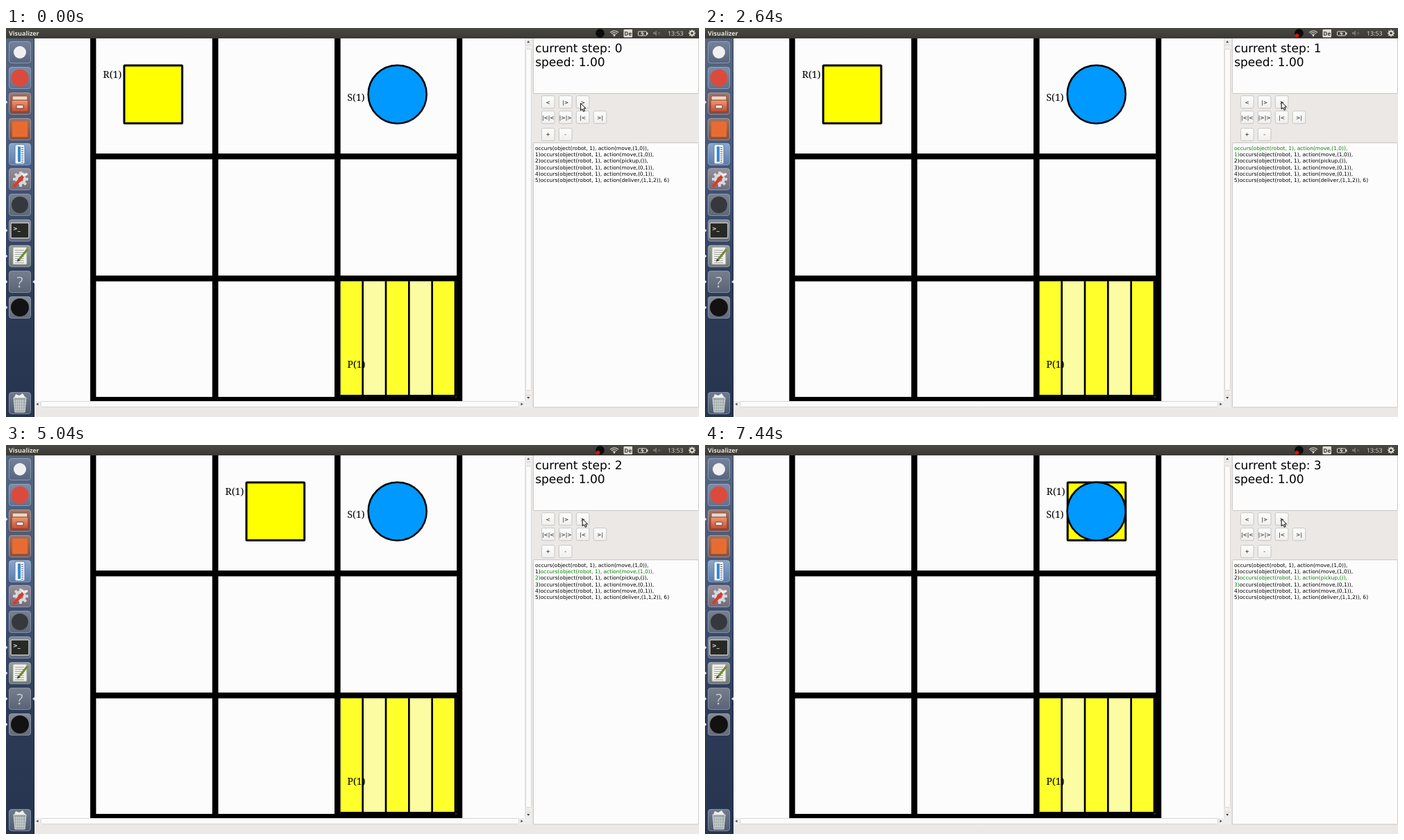
These frames come from a looping animation (998x561 px, 8 s). An HTML page with a canvas:

```html
<!DOCTYPE html>
<html lang="en">
<head>
<meta charset="utf-8">
<title>Visualizer</title>
<style>
html, body { margin: 0; width: 100%; height: 100%; overflow: hidden; background: #fcfcfc; }
canvas { display: block; }
</style>
</head>
<body>
<canvas id="stage" width="998" height="561"></canvas>
<script>
const ctx = document.getElementById('stage').getContext('2d');
const LOOP = 8000;
const SANS = '"DejaVu Sans", sans-serif';
const SERIF = '"Noto Serif", serif';
const UI = '"Open Sans", sans-serif';
const STEPS = [2260, 4240, 7040];
const PRESSES = [[1940, 2080], [3940, 4080], [6740, 6880]];
const ACTIONS = ['move,(1,0)', 'move,(1,0)', 'pickup,()', 'move,(0,1)', 'move,(0,1)', 'deliver,(1,1,2)'];

function rect(x, y, w, h, fill) {
  ctx.fillStyle = fill;
  ctx.fillRect(x, y, w, h);
}

function box(x, y, w, h, r, fill, stroke, line = 1) {
  ctx.beginPath();
  ctx.roundRect(x, y, w, h, r);
  paint(fill, stroke, line);
}

function disc(x, y, r, fill, stroke, line = 1) {
  ctx.beginPath();
  ctx.arc(x, y, r, 0, 2 * Math.PI);
  paint(fill, stroke, line);
}

function poly(points, fill, stroke, line = 1) {
  ctx.beginPath();
  points.forEach(([x, y]) => ctx.lineTo(x, y));
  ctx.closePath();
  paint(fill, stroke, line);
}

function paint(fill, stroke, line) {
  if (fill) { ctx.fillStyle = fill; ctx.fill(); }
  if (stroke) { ctx.strokeStyle = stroke; ctx.lineWidth = line; ctx.stroke(); }
}

function stroke(points, color, line) {
  ctx.beginPath();
  points.forEach(([x, y]) => ctx.lineTo(x, y));
  paint(null, color, line);
}

function text(str, x, y, font, color = '#000', align = 'left') {
  ctx.font = font;
  ctx.fillStyle = color;
  ctx.textAlign = align;
  ctx.fillText(str, x, y);
}

function fade(y0, y1, ...colors) {
  const g = ctx.createLinearGradient(0, y0, 0, y1);
  colors.forEach((c, i) => g.addColorStop(i / (colors.length - 1), c));
  return g;
}

function gear(x, y, r, color, hole) {
  for (let i = 0; i < 8; i++) {
    const a = i * Math.PI / 4, c = Math.cos(a), s = Math.sin(a);
    stroke([[x + c * r * 0.5, y + s * r * 0.5], [x + c * r, y + s * r]], color, r * 0.35);
  }
  disc(x, y, r * 0.72, color);
  disc(x, y, r * 0.35, hole);
}

function topBar(t) {
  rect(0, 0, 998, 15, fade(0, 15, '#4a4843', '#3a3934'));
  text('Visualizer', 4, 10.5, `bold 9px ${UI}`, '#e4e0d8');
  disc(855.5, 7.5, 6.3, '#0b0b0b');
  if (t >= 200) disc(852.5, 11, 2.8, '#e00f0f');

  const ink = '#dfdbd2';
  for (const r of [3, 5.5, 8]) {
    ctx.beginPath();
    ctx.arc(876, 12, r, -Math.PI * 0.76, -Math.PI * 0.24);
    paint(null, ink, 1.1);
  }
  disc(876, 11, 1.2, ink);
  box(889.5, 2, 12.5, 11.5, 1, ink);
  text('De', 895.8, 10.8, `bold 8px ${UI}`, '#3c3b37', 'center');
  box(910.5, 5, 12, 6, 1, null, ink);
  rect(923, 6.5, 1.5, 3, ink);
  poly([[917, 4], [914, 8.5], [916.5, 8.5], [915.5, 12], [919, 7.5], [916.6, 7.5]], ink);
  poly([[932, 6], [934, 6], [937, 3.5], [937, 11.5], [934, 9], [932, 9]], '#77746d');
  stroke([[939, 6], [942, 9.5]], '#77746d', 1);
  stroke([[942, 6], [939, 9.5]], '#77746d', 1);
  text('13:53', 953, 10.8, `8.8px ${UI}`, ink);
  gear(988, 7.5, 5, ink, '#3c3b37');
}

function tile(y, top, bottom) {
  box(4.5, y - 15.5, 31, 31, 3.5, fade(y - 16, y + 16, top, bottom), 'rgba(220,225,235,.4)');
}

function launcher() {
  rect(0, 15, 41, 546, fade(15, 561, '#566681', '#45577a', '#2d3b57', '#263450'));
  rect(40, 15, 1, 546, 'rgba(10,15,30,.5)');

  tile(35, '#75829a', '#56647e');
  disc(20, 35, 9, '#f0f0f2');
  tile(72, '#7d8da6', '#60728e');
  disc(20, 72, 12.5, '#dc4a3d');

  tile(109, '#a5776b', '#78504b');
  box(9, 98, 22, 10, 1.5, '#e8d8c4', '#82452c');
  box(8, 104, 24, 17, 1.5, fade(104, 121, '#ef9b78', '#c24c32'), '#8b3524');
  box(15, 111, 10, 5, 1, '#eee6df', '#773425');

  tile(146, '#a3735c', '#835343');
  box(9, 135, 22, 22, 1, '#e86c31');

  tile(182, '#8ba8ce', '#5c7ba9');
  box(13, 168, 14, 28, 2, '#f0f4f6', '#5c7da6');
  rect(17, 171, 4, 22, '#348bd0');
  for (let y = 172; y < 194; y += 3) rect(22, y, 3, 1, '#667');

  tile(218, '#978f98', '#706c7b');
  gear(21, 218, 11, '#d6d8da', '#85818d');
  stroke([[11, 229], [26, 212]], '#d93b2b', 4.5);
  stroke([[23, 209], [26, 213], [31, 210]], '#eee', 3);

  tile(255, '#77818f', '#5d6877');
  disc(20, 255, 12, '#35393d');

  tile(292, '#848b98', '#5c6678');
  box(7, 281, 26, 22, 1.5, '#282925', '#c5c7c5', 1.5);
  text('>_', 10, 292, `bold 8px ${SANS}`, '#f0f0ec');

  tile(329, '#969f9a', '#6c787a');
  box(10, 316, 20, 25, 1, '#eff0e9', '#999');
  for (let y = 320; y < 339; y += 3) rect(13, y, 13, 1, '#a4a7a4');
  stroke([[18, 335], [31, 319]], '#718d35', 3.2);
  poly([[16, 337], [17, 333], [20, 335.5]], '#333');

  tile(366, '#777f8e', '#596375');
  text('?', 20, 373.5, `21px ${UI}`, '#c6cbd1', 'center');
  tile(403, '#858b96', '#626a79');
  disc(20, 403, 13, '#121212');

  tile(541, '#707b8e', '#4d5a71');
  poly([[11, 533], [29, 533], [27, 554], [13, 554]], '#9ca6a7', '#dce1df');
  for (let x = 15; x < 27; x += 3) stroke([[x, 536], [x + 0.3, 552]], '#e0e5e1', 0.8);
  for (let y = 538; y < 552; y += 4) stroke([[12, y], [28, y]], '#d5dcda', 0.7);
  poly([[12, 533], [14, 528], [19, 530], [24, 527], [28, 533]], '#eef0ec');

  for (const y of [107, 292, 329, 366, 403]) poly([[0, y - 2.5], [2.5, y], [0, y + 2.5]], '#d8dce4');
  poly([[41, 363.5], [38, 366], [41, 368.5]], '#d8dce4');
}

function robot(dx) {
  box(170.2 + dx, 54, 83.6, 83.6, 1, '#ffff00', '#000', 3);
  text('R(1)', 139.8 + dx, 72.3, `14px ${SERIF}`);
}

function board(step) {
  rect(41, 15, 707, 523, '#fcfcfc');
  rect(121.3, 15, 535.9, 523, '#000');
  for (let col = 0; col < 3; col++) {
    for (let row = 0; row < 3; row++) {
      const y = row ? 13.4 + row * 176 : 15;
      const end = row < 2 ? 181 + row * 176 : 532;
      rect(129.7 + col * 176, y, 167.4, end - y, '#fcfcfc');
    }
  }
  rect(481.5, 365.2, 168, 167, '#000');
  for (let i = 0; i < 5; i++) {
    rect(481.8 + i * 33.3, 365.3, 30.6, 163.7, i % 2 ? '#fcfca2' : '#ffff2b');
  }
  rect(647.5, 531.5, 1, 1, '#ddd');
  text('P(1)', 491.5, 490.3, `14px ${SERIF}`);

  robot(Math.max(0, step - 1) * 176);
  disc(563.7, 95.7, 42, '#0099ff', '#000', 2.5);
  text('S(1)', 491.5, 105.3, `14px ${SERIF}`);
}

function scrollbars() {
  rect(748, 15, 9, 532, '#f0eeec');
  rect(747.5, 15, 0.8, 523, '#d3d0cc');
  box(748.5, 30.5, 8, 492, 1, '#fbfbfb', '#d2cfcb', 0.8);
  rect(748, 24, 9, 0.7, '#d2cfcb');
  rect(748, 529, 9, 0.7, '#d2cfcb');
  poly([[750.2, 21.2], [754.2, 21.2], [752.2, 18.2]], '#444');
  poly([[750.2, 532], [754.2, 532], [752.2, 535]], '#444');

  rect(41, 538, 716, 9, '#f0eeec');
  box(50.5, 538.5, 688, 8, 1, '#fbfbfb', '#d2cfcb', 0.8);
  poly([[46.5, 540.5], [46.5, 544.5], [43.5, 542.5]], '#444');
  poly([[741.5, 540.5], [741.5, 544.5], [744.5, 542.5]], '#444');
  rect(41, 547, 957, 14, '#ebe8e5');
}

function button(label, col, y, down) {
  const x = 780.8 + col * 24.9;
  const fill = down ? '#d3d1cf' : fade(y - 9, y + 9, '#fdfdfd', '#f1efed');
  box(x - 9.3, y - 9, 18.6, 18, 2, fill, down ? '#aaa6a2' : '#c5c1bd', 0.9);
  text(label, x, y + 2.7, `7.6px ${SANS}`, '#111', 'center');
}

function panel(step, down) {
  rect(757, 15, 241, 532, '#ebe8e5');
  box(759.4, 14.5, 238.2, 80, 1, '#fcfcfc', '#c5c1bd', 0.9);
  box(759.4, 165.6, 238.2, 381.4, 1, '#fcfcfc', '#c5c1bd', 0.9);
  text(`current step: ${step}`, 762.2, 34.6, `17px ${SANS}`);
  text('speed: 1.00', 762.2, 55, `17px ${SANS}`);

  button('<', 0, 106.8);
  button('|>', 1, 106.8);
  button('>', 2, 106.8, down);
  ['|<|<', '|>|>', '|<', '>|'].forEach((s, i) => button(s, i, 128.8));
  button('+', 0, 153.6);
  button('-', 1, 153.6);

  const font = `7.53px ${SANS}`;
  const color = i => i === step ? '#0a800a' : '#000';
  ACTIONS.forEach((act, i) => {
    const y = 175.8 + i * 9.32;
    const lead = i ? `${i})` : '';
    const tail = i === 5 ? ' 6)' : '';
    text(lead, 762, y, font, color(i));
    const x = 762 + ctx.measureText(lead).width;
    text(`occurs(object(robot, 1), action(${act}),${tail}`, x, y, font, color(i + 1));
  });
}

function cursor(t) {
  const p = Math.min(1, Math.max(0, (t - 800) / 160));
  ctx.save();
  ctx.translate(827.6 + 2.6 * p, 108.6 - 2 * p);
  poly([[0, 0], [0, 10.3], [2.4, 8.2], [4, 11.8], [5.8, 11], [4.2, 7.5], [7.3, 7.3]], '#fff', '#000', 1);
  ctx.restore();
}

function draw(t) {
  const step = STEPS.filter(s => t >= s).length;
  const down = PRESSES.some(([a, b]) => t >= a && t < b);
  ctx.textRendering = 'geometricPrecision';
  board(step);
  scrollbars();
  panel(step, down);
  launcher();
  topBar(t);
  cursor(t);
}

const start = performance.now();
function frame(now) {
  draw(Math.max(0, now - start) % LOOP);
  requestAnimationFrame(frame);
}
draw(0);
requestAnimationFrame(frame);
</script>
</body>
</html>
```
